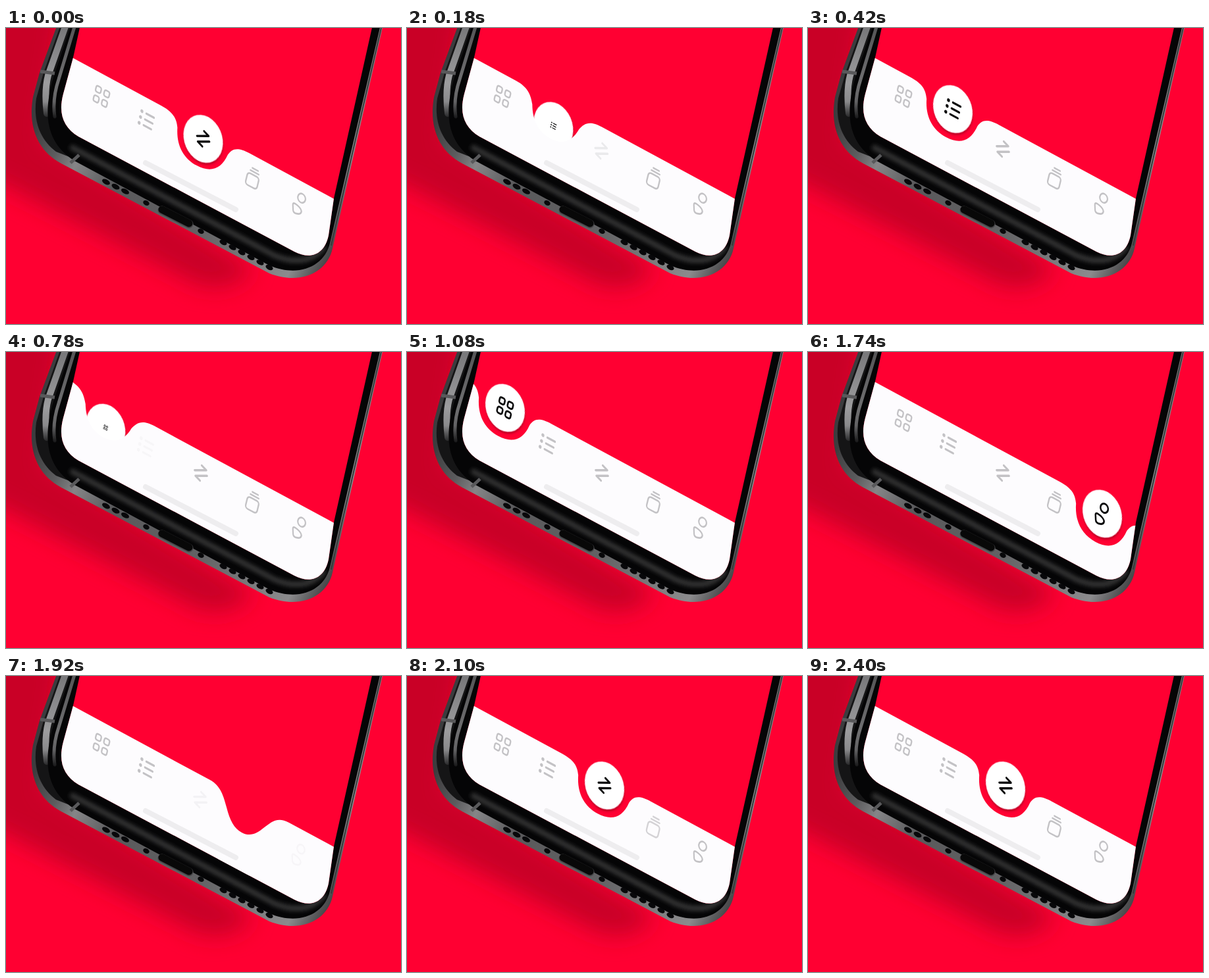
These frames come from a looping animation (600 by 450 pixels, 2.46 s). An HTML page:

```html
<!DOCTYPE html>
<html lang="en">
<head>
<meta charset="utf-8">
<title>Tab bar</title>
<style>
  html, body { margin: 0; width: 100%; height: 100%; overflow: hidden; background: #ff0032; }
  svg { display: block; width: 100%; height: 100%; fill: none; stroke-linecap: round; stroke-linejoin: round; }
</style>
</head>
<body>
<svg viewBox="0 0 600 450">
  <defs>
    <filter id="soft" x="-30%" y="-30%" width="160%" height="160%"><feGaussianBlur stdDeviation="17"/></filter>
    <filter id="glow" x="-20%" y="-20%" width="140%" height="140%"><feGaussianBlur stdDeviation="3"/></filter>
    <filter id="lift" x="-30%" y="-30%" width="160%" height="160%">
      <feDropShadow dx="1" dy="2" stdDeviation="1.6" flood-color="#300" flood-opacity=".38"/>
    </filter>
    <linearGradient id="metal" gradientUnits="userSpaceOnUse" x1="40" y1="150" x2="480" y2="385">
      <stop offset="0" stop-color="#3c3c3e"/><stop offset=".1" stop-color="#5c5c5e"/>
      <stop offset=".17" stop-color="#858587"/><stop offset=".3" stop-color="#59595b"/>
      <stop offset=".6" stop-color="#626264"/><stop offset=".9" stop-color="#8b8b8d"/>
      <stop offset="1" stop-color="#3a3a3c"/>
    </linearGradient>
    <linearGradient id="side" gradientUnits="userSpaceOnUse" x1="0" y1="0" x2="0" y2="140">
      <stop offset="0" stop-color="#78787a"/><stop offset=".6" stop-color="#9c9c9e"/>
      <stop offset=".8" stop-color="#8a8a8c"/><stop offset="1" stop-color="#151516"/>
    </linearGradient>
    <clipPath id="screen">
      <path d="M113-5L102 45L87 100C79 130 87 151 110 165L438 340C463 353 484 344 490 315L498 259L557-5Z"/>
    </clipPath>
  </defs>

  <path d="M0 0H600V450H0Z" fill="#ff0032"/>
  <path d="M-60-60H95L60 170L375 365Q350 402 295 392L0 241L-60 211Z" fill="#c90028" filter="url(#soft)"/>

  <!-- phone body -->
  <path d="M78-5L51 68L41 105C33 150 48 187 84 206L400 373C445 391 488 373 496 335L573-5Z" fill="url(#metal)"/>
  <path d="M83-5L57 68L46 107C41 142 52 170 76 188L104 199L120-5Z" fill="#151516"/>
  <path d="M91-5L64 72Q58 95 62 130" stroke="url(#side)" stroke-width="10"/>
  <path d="M99-5L73 72C57 125 57 172 104 202L400 361C445 380 484 362 492 327L569-5Z" fill="#050506"/>
  <path d="M105-5L80 78Q70 108 74 135" stroke="url(#side)" stroke-width="5" opacity=".7"/>
  <path d="M101 182L408 346Q455 365 482 335" stroke="#343436" stroke-width="8" filter="url(#glow)"/>
  <path d="M571-5L494 330" stroke="#39393b" stroke-width="2"/>
  <path d="M52 66L74 69M98 205L111 193" stroke="#59595b" stroke-width="5" stroke-linecap="butt"/>
  <path d="M237 277L278 298" stroke="#47474a" stroke-width="13"/>
  <path d="M237 276L278 297" stroke="#080808" stroke-width="11"/>
  <g id="holes" fill="#08080a"></g>

  <!-- app -->
  <g clip-path="url(#screen)">
    <path d="M0 0H600V450H0Z" fill="#ff0032"/>
    <g id="disc">
      <circle r="30" fill="#fff" filter="url(#lift)"/>
      <g id="active" stroke="#0b0b0c" stroke-width="2.5"></g>
    </g>
    <path id="bar" fill="#fdfcfe"/>
    <path d="M212 205L349 276" stroke="#eeedef" stroke-width="8"/>
    <g id="tabs" stroke="#c3c2c5" stroke-width="2.2"></g>
  </g>
</svg>
<script>
  const LOOP = 2460, STEP = 60;
  const starts = [-40, 570, 1185, 1795, 2420];
  const stops = [2, 1, 0, 4, 2, 1];
  const discX = [149, 220, 300, 374, 447];
  const tabAt = [[145, 104], [213, 140], [296, 184], [375, 228], [446, 267]];

  // right half of the notch, from shoulder to bottom: around the disc, and while travelling
  const roundNotch = [[70, -11], [50, -11], [44, -5], [40, 5], [36, 27], [22, 39], [0, 39]];
  const bellNotch = [[62, -11], [44, -11], [37, 1], [29, 12], [20, 25], [12, 32], [0, 32]];

  const cell = (x, y) => `<rect x="${x}" y="${y}" width="8" height="8" rx="2.5"/>`;
  const glyphs = [
    cell(-10.5, -10.5) + cell(2.5, -10.5) + cell(-10.5, 2.5) + cell(2.5, 2.5),
    '<path d="M-9-8v0M-9 0v0M-9 8v0" stroke-width="4.6"/><path d="M-2-8H10M-2 0H10M-2 8H10" stroke-width="2.8"/>',
    '<path d="M-9-3.5H9L3-9.5M9 3.5H-9L-3 9.5" stroke-width="2.8" transform="rotate(-25)"/>',
    '<rect x="-9" y="-4" width="18" height="16" rx="4"/><path d="M-6-8H7M-4-12H5"/>',
    '<circle cx="1" cy="-8" r="5.8"/><path d="M-6 3Q-10 3-9 6L-7 12Q-6 15-2 14.5Q6 13 5 8Q3 4-6 3Z"/>'
  ];

  const $ = id => document.getElementById(id);
  const clamp = x => Math.max(0, Math.min(1, x));
  const mix = (a, b, p) => a + (b - a) * p;
  const place = (el, x, y, extra = '') =>
    el.setAttribute('transform', `matrix(.963 .52 -.264 1.1 ${x} ${y}) ${extra}`);
  const barY = x => .54 * x + 4.4;

  $('tabs').innerHTML = glyphs.map(g => `<g>${g}</g>`).join('');
  const hole = (x, y, r) => `<ellipse rx="${r}" ry="3.6" transform="translate(${x} ${y}) rotate(28)"/>`;
  let holes = hole(213, 266, 5) + hole(296, 309, 5);
  for (let i = 0; i < 3; i++) holes += hole(152 + 14.5 * i, 234 + 7.2 * i, 6.5);
  for (let i = 0; i < 6; i++) holes += hole(330 + 14 * i, 326 + 7.6 * i, 6);
  $('holes').innerHTML = holes;

  function phase(t) {
    t = (t + LOOP) % LOOP;
    const k = starts.findLastIndex(s => s <= t);
    const e = t - starts[k];
    const p = 1 - (1 - clamp((e - 40) / 260)) ** 2;
    return { k, e, x: mix(discX[stops[k]], discX[stops[k + 1]], p) };
  }

  function barPath(bell) {
    const right = roundNotch.map(([x, y], i) => [mix(x, bellNotch[i][0], bell), mix(y, bellNotch[i][1], bell)]);
    const left = right.map(([x, y]) => [-x, y]);
    const [first, ...rest] = [...left, ...right.reverse().slice(1)];
    return `M-700-11L${first}C${rest.join(' ')}L700-11V500H-700Z`;
  }

  const clearance = (i, x) => clamp((Math.abs(x - discX[i]) - 45) / 25);

  function draw(t) {
    const { k, e, x } = phase(t);
    const y = barY(x), leaving = e < 120;

    // the disc sinks behind the bar and rises with the next glyph
    const sink = leaving ? clamp((e - 25) / 90) ** 2 : (1 - clamp((e - 120) / 180)) ** 1.5;
    place($('disc'), x, y, `translate(0 ${66 * sink})`);
    $('bar').setAttribute('d', barPath(sink));
    place($('bar'), x, y);

    const size = leaving ? 1 - clamp((e - 40) / 60) : 1 - (1 - clamp((e - 190) / 140)) ** 2;
    $('active').innerHTML = glyphs[stops[leaving ? k : k + 1]];
    $('active').setAttribute('transform', `scale(${size})`);

    // tabs hide near the notch and return with a short delay
    const trail = [x, phase(t - 45).x, phase(t - 90).x];
    [...$('tabs').children].forEach((tab, i) => {
      const seen = trail.map(at => clearance(i, at));
      let a = Math.min(seen[0], (seen[0] + seen[1] + seen[2]) / 3);
      if (i === stops[k + 1]) a *= 1 - clamp((e - 40) / 160);
      place(tab, ...tabAt[i], `translate(0 ${6 * (1 - a)})`);
      tab.setAttribute('opacity', a * a);
    });
  }

  function tick() {
    draw(Math.floor(performance.now() % LOOP / STEP) * STEP);
    requestAnimationFrame(tick);
  }
  tick();
</script>
</body>
</html>
```
